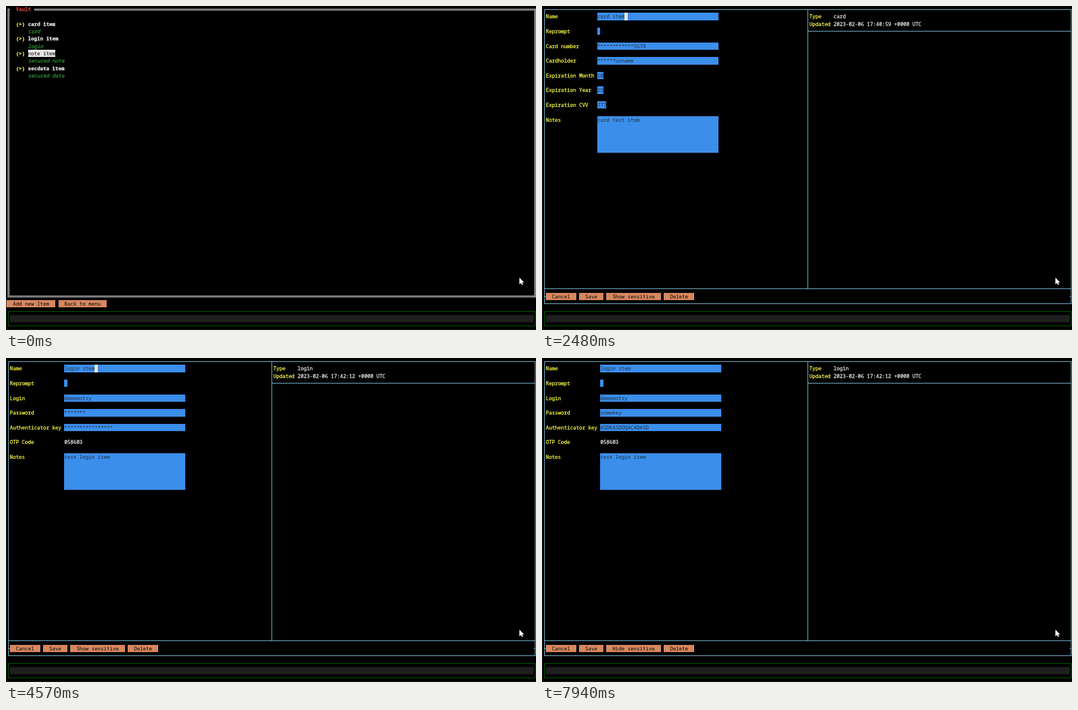
Animation, 958 px wide and 585 px high, one loop 8000 ms. Source, as an HTML page with a canvas:

```html
<!DOCTYPE html>
<html lang="en">
<head>
<meta charset="utf-8">
<title>Vault</title>
<style>
  html, body { margin: 0; width: 100%; height: 100%; overflow: hidden; background: #000; }
  canvas { display: block; }
</style>
</head>
<body>
<canvas id="stage" width="958" height="585"></canvas>
<script>
const ctx = document.getElementById('stage').getContext('2d');
const LOOP = 8000, CELL_W = 5.475, CELL_H = 13.295;
const COLOR = {
  white: '#e5e5e5', yellow: '#f5f543', blue: '#3b8eea', red: '#f14c4c',
  sky: '#87ceeb', orange: '#d7875f', green: '#339433', darkGreen: '#006400',
  ink: '#1e2a3a', gray: '#1e1e1e', black: '#000'
};
const DARK_INKS = [COLOR.ink, COLOR.black];

// Terminal cell grid
const colX = col => 1.45 + col * CELL_W;
const rowY = row => row * CELL_H - 0.85;

function box(x, y, w, h, color) {
  ctx.fillStyle = color;
  ctx.fillRect(x, y, w, h);
}

function cells(col, row, cols, rows, color) {
  const x = Math.round(colX(col)), y = Math.round(rowY(row));
  box(x, y, Math.round(colX(col + cols)) - x, Math.round(rowY(row + rows)) - y, color);
}

// Light text gets a thin outline, as terminals render it heavier on black
function text(col, row, string, color, style = '') {
  ctx.font = `${style} 9.125px "Noto Sans Mono", monospace`;
  ctx.fillStyle = ctx.strokeStyle = color;
  ctx.lineWidth = 0.35;
  const baseline = Math.round(rowY(row) + 10);
  [...string].forEach((char, i) => {
    ctx.fillText(char, colX(col + i), baseline);
    if (!DARK_INKS.includes(color)) ctx.strokeText(char, colX(col + i), baseline);
  });
}

const hLine = (x1, x2, y, color) => box(x1, y, x2 - x1, 1, color);
const vLine = (x, y1, y2, color) => box(x, y1, 1, y2 - y1, color);

function outline(x1, y1, x2, y2, color) {
  hLine(x1, x2 + 1, y1, color);
  hLine(x1, x2 + 1, y2, color);
  vLine(x1, y1, y2, color);
  vLine(x2, y1, y2, color);
}

function button(col, row, label, focused) {
  cells(col, row, label.length + 4, 1, focused ? COLOR.white : COLOR.orange);
  text(col + 2, row, label, focused ? COLOR.blue : COLOR.black);
}

const ITEMS = [
  ['card item', 'card'],
  ['login item', 'login'],
  ['note item', 'secured note'],
  ['secdata item', 'secured data']
];

// Fields: label, masked value, revealed value, width in cells (0 = plain text), height in cells
const FORMS = {
  card: {
    col: 18, updated: '2023-02-06 17:40:59 +0000 UTC',
    fields: [
      ['Name', 'card item', 'card item', 40],
      ['Reprompt', '', '', 1],
      ['Card number', '*'.repeat(12) + '5678', '1234567812345678', 40],
      ['Cardholder', '******urname', 'Name Surname', 40],
      ['Expiration Month', '10', '10', 2],
      ['Expiration Year', '25', '25', 2],
      ['Expiration CVV', '777', '777', 3],
      ['Notes', 'card test item', 'card test item', 40, 5]
    ]
  },
  login: {
    col: 19, updated: '2023-02-06 17:42:12 +0000 UTC',
    fields: [
      ['Name', 'login item', 'login item', 40],
      ['Reprompt', '', '', 1],
      ['Login', 'demoentry', 'demoentry', 40],
      ['Password', '*'.repeat(7), 'somekey', 40],
      ['Authenticator key', '*'.repeat(16), 'ASDKASDOQACADASD', 40],
      ['OTP Code', '058603', '058603', 0],
      ['Notes', 'test login item', 'test login item', 40, 5]
    ]
  }
};

function drawVaultFrame() {
  outline(3, 5, 957, 525, COLOR.white);
  outline(5, 7, 955, 523, COLOR.white);
  cells(1, 0, 8, 1, COLOR.black);
  text(3, 0, 'Vault', COLOR.red);
}

function drawMenuButtons() {
  button(0, 40, 'Add new Item');
  button(17, 40, 'Back to menu');
}

function drawList(selected) {
  drawVaultFrame();
  ITEMS.forEach(([name, type], i) => {
    const row = 2 + i * 2;
    text(3, row, '(>)', COLOR.yellow, 'bold');
    if (i === selected) {
      cells(7, row, name.length, 1, COLOR.white);
      text(7, row, name, COLOR.black);
    } else {
      text(7, row, name, COLOR.white, 'bold');
    }
    text(7, row + 1, type, COLOR.green, 'italic');
  });
  drawMenuButtons();
}

function drawFormBorder(partial) {
  if (partial) {
    // Only the cells above the button row have been repainted so far
    drawVaultFrame();
    box(1, 0, 957, Math.round(rowY(38)), COLOR.black);
    box(1, 500, 940, Math.round(rowY(39)) - 500, COLOR.black);
    vLine(4, 6, 517, COLOR.sky);
    vLine(956, 6, 504, COLOR.sky);
    hLine(4, 957, 6, COLOR.sky);
    hLine(4, 532, 510, COLOR.sky);
    drawMenuButtons();
  } else {
    outline(4, 6, 956, 537, COLOR.sky);
    hLine(4, 957, 510, COLOR.sky);
    hLine(4, 7, 524, COLOR.sky);
    hLine(954, 957, 524, COLOR.sky);
  }
  vLine(480, 6, 510, COLOR.sky);
  hLine(480, 957, 45, COLOR.sky);
}

function drawForm(type, { partial, revealed, cursor, focus } = {}) {
  const { col, updated, fields } = FORMS[type];
  drawFormBorder(partial);
  fields.forEach(([label, masked, plain, width, height = 1], i) => {
    const row = 1 + i * 2;
    text(1, row, label, COLOR.yellow);
    if (width) cells(col, row, width, height, COLOR.blue);
    text(col, row, revealed ? plain : masked, width ? COLOR.ink : COLOR.white);
  });
  if (cursor) cells(col + fields[0][1].length, 1, 1, 1, COLOR.white);

  text(88, 1, 'Type', COLOR.yellow);
  text(96, 1, type, COLOR.white);
  text(88, 2, 'Updated', COLOR.yellow);
  text(96, 2, updated, COLOR.white);

  if (partial) return;
  let buttonCol = 1;
  ['Cancel', 'Save', revealed ? 'Hide sensitive' : 'Show sensitive', 'Delete'].forEach((label, i) => {
    button(buttonCol, 39, label, i === focus);
    buttonCol += label.length + 5;
  });
}

function drawPointer() {
  ctx.fillStyle = '#fff';
  ctx.fill(new Path2D('M928 490.5V502.5L930.8 500L932.7 504L934.6 503.1L932.8 499.3H936.5Z'));
}

// Start time of each state
const TIMELINE = [
  [0, () => drawList(2)],
  [860, () => drawList(1)],
  [1060, () => drawList(0)],
  [1260, () => drawForm('card', { partial: true })],
  [1330, () => drawForm('card', { cursor: true })],
  [1880, () => drawForm('card')],
  [2480, () => drawForm('card', { cursor: true })],
  [2610, () => drawForm('card', { focus: 0 })],
  [2870, () => drawForm('card', { focus: 1 })],
  [3100, () => drawForm('card', { focus: 2 })],
  [3300, () => drawForm('card', { revealed: true, cursor: true })],
  [3910, () => drawForm('card', { revealed: true })],
  [3980, () => drawList(0)],
  [4240, () => drawList(1)],
  [4570, () => drawForm('login', { cursor: true })],
  [5170, () => drawForm('login')],
  [5770, () => drawForm('login', { cursor: true })],
  [6330, () => drawForm('login')],
  [6480, () => drawForm('login', { focus: 0 })],
  [6810, () => drawForm('login', { focus: 1 })],
  [7010, () => drawForm('login', { focus: 2 })],
  [7340, () => drawForm('login', { revealed: true, cursor: true })],
  [7940, () => drawForm('login', { revealed: true })]
];

const start = performance.now();

function render() {
  const time = (performance.now() - start) % LOOP;
  box(0, 0, 958, 585, COLOR.gray);
  box(1, 0, 957, 584, COLOR.black);
  TIMELINE.findLast(([from]) => from <= time)[1]();
  outline(4, 551, 956, 577, COLOR.darkGreen);
  cells(1, 42, 173, 1, COLOR.gray);
  drawPointer();
  requestAnimationFrame(render);
}
render();
</script>
</body>
</html>
```
